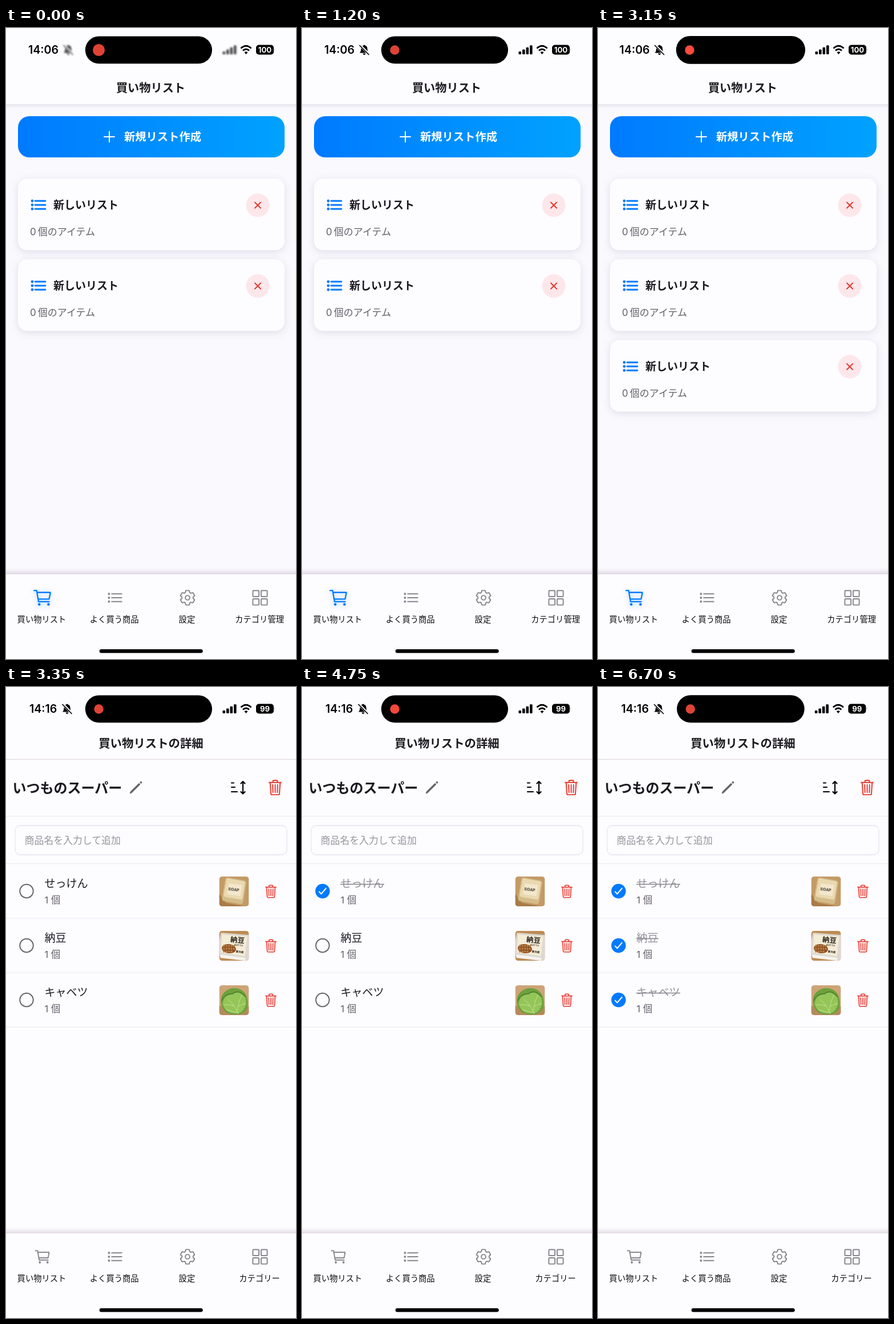
These frames come from a looping animation (508x1102 px, 6750 ms). An HTML page:

```html
<!DOCTYPE html>
<html lang="ja">
<head>
<meta charset="utf-8">
<title>買い物リスト</title>
<style>
  html, body { margin: 0; width: 100%; height: 100%; overflow: hidden; background: #fcfbff; }
  svg { display: block; width: 508px; height: 1102px; font-family: Inter, "Noto Sans CJK JP", "Noto Sans CJK", sans-serif; }
  .line { fill: none; stroke: currentColor; stroke-width: 2; stroke-linecap: round; stroke-linejoin: round; }
  .icon { fill: none; stroke: currentColor; stroke-width: 32; stroke-linecap: round; stroke-linejoin: round; }
  .icon .solid { fill: currentColor; }
  .card { fill: #fdfcff; filter: drop-shadow(0 3px 7px rgba(40, 35, 80, .13)); }
  .header { fill: #fdfcff; filter: drop-shadow(0 1px 4px rgba(50, 40, 75, .16)); }
  .tabbar { fill: #fdfcff; filter: drop-shadow(0 -3px 5px rgba(75, 35, 75, .2)); }
  .blue { color: #007aff; }
  .gray { color: #87858d; }
  .red { color: #e5382e; }
  .white { color: #fff; }
  .dark { color: #66636a; }
  .glow { filter: drop-shadow(0 2px 4px rgba(0, 122, 255, .3)); }
</style>
</head>
<body>
<svg id="stage" viewBox="0 0 508 1102"></svg>
<script>
const LOOP = 6750, SWITCH = 3300;
const CHECK_TIMES = [4450, 5150, 5950];

const text = (x, cy, size, str, { fill = '#1b191f', weight = 400, anchor = 'start' } = {}) =>
  `<text x="${x}" y="${cy + size * .375}" font-size="${size}" font-weight="${weight}" fill="${fill}" text-anchor="${anchor}">${str}</text>`;
const line = (d, extra = '') => `<path class="line" d="${d}" ${extra}/>`;
const at = (x, y, body, cls = '') => `<g transform="translate(${x} ${y})" class="${cls}">${body}</g>`;
const times = (n, fn) => Array.from({ length: n }, (_, i) => fn(i)).join('');

// Icons are drawn on a 512 unit square and centred on x, y.
const icon = (x, y, size, body, cls) =>
  `<g class="${cls}"><g class="icon" transform="translate(${x} ${y}) scale(${size / 512}) translate(-256 -256)">${body}</g></g>`;

const cart = `<path d="M48 80h64l48 272h256M160 288h249q7 0 8-6l29-144q2-10-8-10H128"/>
  <circle class="solid" cx="176" cy="416" r="16"/><circle class="solid" cx="400" cy="416" r="16"/>`;
const bullets = '<path d="M160 144h288M160 256h288M160 368h288"/>' +
  times(3, i => `<circle class="solid" cx="80" cy="${144 + i * 112}" r="16"/>`);
const grid = times(4, i =>
  `<rect x="${i % 2 ? 288 : 48}" y="${i > 1 ? 288 : 48}" width="176" height="176" rx="20"/>`);
const trash = `<path d="M112 112l20 320q2 32 32 32h184q30 0 32-32l20-320M80 112h352M192 112V72q0-24 24-24h80q24 0 24 24v40
  M256 176v224M184 176l8 224M328 176l-8 224"/>`;
const pencil = `<path class="solid" d="M359 129L86 402 70 442l40-16 273-272ZM413 75l-12 12 24 24 12-12q12-12 0-24-12-12-24 0Z"/>`;

function gearIcon() {
  const points = [];
  for (let tooth = 0; tooth < 6; tooth++)
    for (const [angle, r] of [[-24, 162], [-13, 214], [13, 214], [24, 162]]) {
      const a = (tooth * 60 + angle - 90) * Math.PI / 180;
      points.push(`${(256 + r * Math.cos(a)).toFixed(1)} ${(256 + r * Math.sin(a)).toFixed(1)}`);
    }
  return `<path d="M${points.join('L')}Z"/><circle cx="256" cy="256" r="64"/>`;
}

const tabs = (active, lastLabel) =>
  '<rect class="tabbar" x="-30" y="954" width="568" height="190"/>' +
  icon(64, 995, active ? 37 : 31, cart, active ? 'blue glow' : 'gray') +
  icon(191, 995, 31, bullets, 'gray') + icon(318, 995, 31, gearIcon(), 'gray') + icon(445, 995, 31, grid, 'gray') +
  ['買い物リスト', 'よく買う商品', '設定', lastLabel].map((label, i) =>
    text(62.5 + i * 127.2, 1033, 14.3, label, { anchor: 'middle', fill: '#0c0b0e', weight: 500 })).join('') +
  '<rect x="163.700" y="1085" width="181" height="6.600" rx="3.300"/>';

const listCard = i => `<g id="card${i}" transform="translate(0 ${i * 141})">
  <rect class="card" x="21" y="263" width="467" height="125" rx="16"/>` +
  icon(57, 309, 32, `<g stroke-width="46">${bullets}</g>`, 'blue') +
  text(83, 309, 19, '新しいリスト', { weight: 600 }) +
  text(42, 356, 17, '0&#8201;個のアイテム', { fill: '#625f68' }) +
  '<circle cx="441" cy="309.500" r="20.500" fill="#fde7eb"/>' +
  at(441, 309.5, line('M-5-5L5 5M5-5L-5 5'), 'red') + '</g>';

const overview = `<g id="overview">
  <rect width="508" height="1102" fill="#faf9fe"/>
  <rect class="header" x="-30" y="-20" width="568" height="153"/>` +
  text(253.5, 104.5, 20.2, '買い物リスト', { weight: 600, anchor: 'middle' }) +
  '<rect x="21" y="154" width="467" height="72" rx="20" fill="url(#button)"/>' +
  at(181, 190, line('M-9 0H9M0-9V9'), 'white') +
  text(207, 190, 19.3, '新規リスト作成', { weight: 600, fill: '#fff' }) +
  times(3, listCard) + tabs(true, 'カテゴリ管理') + '</g>';

const thumbs = [
  `<rect width="52" height="52" fill="#c39a66"/><path d="M0 30L12 46 44 52H0Z" fill="#a97c48"/>
   <path d="M11 3Q13 1 17 2L44 7Q48 8 47 12L42 44Q41 49 36 48L9 43Q4 42 5 37Z" fill="#d4bc8a"/>
   <path d="M13 5Q14 3 18 4L42 8Q46 9 45 13L41 37Q40 41 36 40L12 36Q7 35 8 31Z" fill="#ead9b0"/>
   <path d="M17 12L40 15 37 34 14 31Z" fill="#f3e8cd"/>
   <g transform="rotate(7 25 23)">` + text(25.5, 22.5, 7, 'SOAP', { weight: 700, anchor: 'middle', fill: '#44392d' }) + '</g>',
  `<rect width="52" height="52" fill="#bd8c56"/>
   <path d="M3 3L52 7V52H46L1 43Q-2 22 3 3Z" fill="#ddd8d2"/><path d="M5 6L49 10 45 44 3 38Z" fill="#f5ecd6"/>
   <path d="M1 41L46 47 45 52 2 47Z" fill="#f6f3ee"/>
   <ellipse cx="17" cy="31" rx="12.500" ry="8" fill="#8f5426" transform="rotate(7 17 31)"/>` +
   times(14, i => `<circle cx="${8 + i % 5 * 4.5}" cy="${26 + Math.floor(i / 5) * 5}" r="1.700" fill="#bd8248"/>`) +
   '<g transform="rotate(6 31 16)">' +
   text(32, 15.5, 12.5, '納豆', { weight: 700, anchor: 'middle', fill: '#29221c' }) +
   text(35, 24.5, 4.5, 'NATTO', { weight: 600, anchor: 'middle', fill: '#5a4b3c' }) +
   text(38, 36, 4.5, '要冷蔵', { weight: 600, anchor: 'middle', fill: '#29221c' }) + '</g>',
  `<rect width="52" height="52" fill="#cda478"/><path d="M0 36H52V52H0Z" fill="#b58a5a"/>
   <path d="M3 31Q2 15 13 9Q25 1 39 8Q51 16 50 33Q49 49 32 51Q7 53 3 31Z" fill="#6da03c"/>
   <path d="M6 33Q7 17 23 15Q37 7 46 22Q50 40 36 48Q13 53 6 33Z" fill="#94c558"/>
   <path d="M33 50Q28 35 15 24M32 45Q33 29 40 17M27 36Q18 33 8 34M33 37Q40 32 47 32M34 48Q22 46 12 42" fill="none" stroke="#c3df90"/>
   <path d="M4 27Q10 14 23 15Q34 6 46 20" fill="none" stroke="#487a2b" stroke-width="1.600"/>`
];

const itemRow = (name, i) => `<g transform="translate(0 ${i * 95})">
  <g id="open${i}"><circle cx="36" cy="356.500" r="11.700" fill="none" stroke="#69656e" stroke-width="2"/>
  ${text(67.5, 343, 19, name)}</g>
  <g id="done${i}"><circle cx="36" cy="356.500" r="12.700" fill="#007aff"/>
  ${at(36, 356.5, line('M-5.900 1L-2.300 4.900L5.900-4.900'), 'white')}
  ${text(67.5, 343, 19, name, { fill: '#919097' })}
  <path d="M67 344.500h${name.length * 19 + 1}" stroke="#85838b" stroke-width="1.500"/></g>` +
  text(67.5, 372, 16.5, '1 個', { fill: '#625f68' }) +
  `<g transform="translate(373.500 331)" clip-path="url(#thumb)">${thumbs[i]}</g>` +
  icon(464, 357, 26.5, trash, 'red') +
  '<path d="M0 404H508" stroke="#ebe8f1" stroke-width="1.200"/></g>';

const detail = `<g id="detail">
  <rect width="508" height="1102" fill="#fdfcff"/>
  <path d="M0 126.500H508" stroke="#e3dce4" stroke-width="1.300"/>
  <path d="M0 225.500H508M0 308.500H508" stroke="#ebe8f1" stroke-width="1.200"/>` +
  text(254, 98, 20.4, '買い物リストの詳細', { weight: 600, anchor: 'middle' }) +
  text(11.5, 176, 24, 'いつものスーパー', { weight: 600 }) +
  icon(227.5, 175.5, 27, pencil, 'dark') +
  line('M395 167.500h4M395 175h6M395 183h10M415 166v20M411.500 168.500l3.500-3.500 3.500 3.500M411.500 183l3.500 3.500 3.500-3.500', 'style="stroke-width:2.200"') +
  icon(471.5, 175.5, 31, trash, 'red') +
  '<rect x="16" y="242" width="476" height="51" rx="9" fill="#fdfcff" stroke="#e6e5f2" stroke-width="1.300"/>' +
  text(32.5, 267.5, 16.9, '商品名を入力して追加', { fill: '#97959c' }) +
  ['せっけん', '納豆', 'キャベツ'].map(itemRow).join('') + tabs(false, 'カテゴリー') + '</g>';

const bell = `<path d="M-8 5.500Q-5.500 3-5.500-1.500Q-5.500-6.500-1.500-7.500Q0-9.500 1.500-7.500Q5.500-6.500 5.500-1.500Q5.500 3 8 5.500ZM-2.500 6.500h5Q2 9 0 9T-2.500 6.500Z"/>
  <path d="M-7.500-8L8.500 8" stroke="#fdfcff" stroke-width="4"/><path d="M-8-7.500L8 8.500" stroke="#000" stroke-width="1.700" stroke-linecap="round"/>`;
const signal = times(4, i => `<rect x="${379.5 + i * 6.5}" y="${41 - i * 3.6}" width="4.600" height="${5 + i * 3.6}" rx="1.300"/>`);
const wifi = '<path d="M411.500 35.500Q420.500 27 429.500 35.500M415 39.500Q420.500 34.500 426 39.500" fill="none" stroke="#000" stroke-width="3"/><path d="M417.500 42.500Q420.500 40 423.500 42.500L420.500 46Z"/>';

const status = `<g id="left"><text id="clock" x="39" y="45" font-size="19.600" font-weight="600"></text>
  <g id="bell">${at(109, 38, bell)}</g></g>
  <g id="right"><g id="signal">${signal}</g>${wifi}
  <rect x="438" y="29.500" width="31" height="17" rx="5"/><path d="M470.300 35.500q1.500 2.500 0 5Z" fill="#77757b"/>
  <text id="battery" x="453.500" y="42.800" font-size="13.200" font-weight="700" fill="#fff" text-anchor="middle"></text></g>
  <rect id="island"/><circle id="dot" cy="38.500"/>`;

document.getElementById('stage').innerHTML = `<defs>
  <linearGradient id="button"><stop stop-color="#007aff"/><stop offset="1" stop-color="#00a2ff"/></linearGradient>
  <clipPath id="thumb"><rect width="52" height="52" rx="5"/></clipPath></defs>` + overview + detail + status;

const el = id => document.getElementById(id);
const show = (id, on) => el(id).style.display = on ? '' : 'none';
const set = (id, attrs) => { for (const key in attrs) el(id).setAttribute(key, attrs[key]); };
const ramp = (t, from, to) => Math.min(1, Math.max(0, (t - from) / (to - from)));

function render(t) {
  const inDetail = t >= SWITCH;
  show('overview', !inDetail);
  show('detail', inDetail);

  const count = t < 300 ? 2 : t < 1000 ? 1 : t < 1500 ? 2 : 3;
  for (let i = 0; i < 3; i++) {
    const done = t >= CHECK_TIMES[i];
    show('card' + i, i < count);
    show('open' + i, !done);
    show('done' + i, done);
  }

  // The island swells when pressed at the end of each recording.
  const swell = inDetail ? ramp(t, 6650, 6800) * 2 : ramp(t, 3000, 3150) * 2;
  set('island', { x: 138.8 - swell, y: 14.4 - swell / 4, width: 222.2 + swell * 2, height: 47.8 + swell / 2, rx: 23.9 + swell / 4 });
  set('left', { transform: `translate(${(inDetail ? 2 : 0) - swell * .7} 0)` });
  set('bell', { transform: `translate(${inDetail ? -4 : 0} 0)` });
  set('right', { transform: `translate(${swell * .5} 0)` });
  el('clock').textContent = inDetail ? '14:16' : '14:06';
  el('battery').textContent = inDetail ? '99' : '100';

  const settle = inDetail ? 1 : ramp(t, 0, 300);
  for (const id of ['bell', 'signal']) {
    el(id).style.filter = settle < 1 ? `blur(${1.6 * (1 - settle)}px)` : '';
    el(id).style.opacity = .7 + .3 * settle;
  }

  const pulse = inDetail
    ? .5 - .5 * Math.cos((t - 5550) / 1150 * 2 * Math.PI)
    : .5 + .5 * Math.cos((t - 1850) / 1300 * 2 * Math.PI);
  set('dot', { cx: 162.5 - swell, r: 10.5 - 2.3 * settle, fill: `rgb(${222 + 33 * pulse},${67 + 8 * pulse},${54 + 7 * pulse})` });
}

function tick(now) {
  render(now % LOOP);
  requestAnimationFrame(tick);
}
render(0);
requestAnimationFrame(tick);
</script>
</body>
</html>
```
